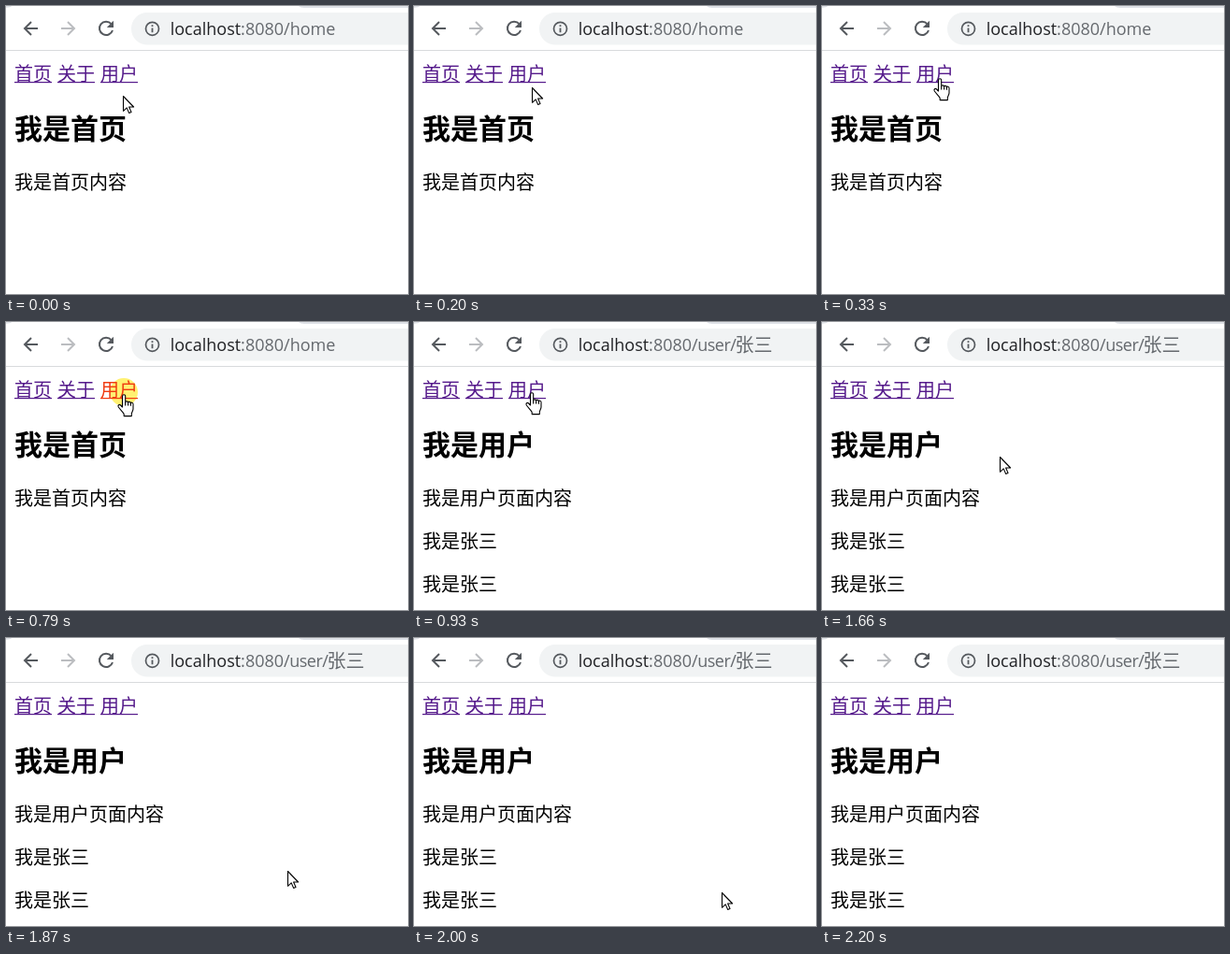
Write an HTML page that moves like this. It is 430 px wide and 308 px high and loops after 2660 ms.

```html
<!DOCTYPE html>
<html lang="zh-CN">
<head>
<meta charset="utf-8">
<title>首页</title>
<style>
html, body { margin: 0; width: 100%; height: 100%; overflow: hidden; background: #fff; }
svg { display: block; width: 430px; height: 308px; }
text { font: 400 20px "Noto Sans CJK SC", "Noto Sans CJK", sans-serif; fill: #000; }
.title { font-size: 30px; font-weight: 700; }
.url { font: 400 18px "Open Sans", "Noto Sans", sans-serif; fill: #202124; }
.path { fill: #65696e; }
.tight { letter-spacing: -.5px; }
.link text, .link rect { fill: #551a8b; }
.link.active text, .link.active rect { fill: #f03a10; }
.icon { fill: none; stroke: #55595e; stroke-width: 2; }
.cursor { fill: #fff; stroke: #000; stroke-width: 1.1; stroke-linejoin: round; }
</style>
</head>
<body>
<svg viewBox="0 0 430 308">
  <!-- browser toolbar -->
  <path d="M0 0H6Q5 1.6 0 1.8ZM313 0H430V2H319Q315 2 313 0Z" fill="#dee1e6"/>
  <rect y="47" width="430" height="1" fill="#d8dadd"/>
  <rect x="134" y="7" width="330" height="34.5" rx="17.2" fill="#f1f3f4"/>
  <path class="icon" d="M34 24H20M27 17L20 24L27 31"/>
  <path class="icon" d="M59 24H73M66 17L73 24L66 31" style="stroke:#bbbdc0"/>
  <path class="icon" d="M112.6 19.2A7.2 7.2 0 1 0 114 26"/>
  <path d="M115 15.8V23H107.8Z" fill="#55595e"/>
  <circle class="icon" cx="156.5" cy="24.3" r="7" style="stroke-width:1.7"/>
  <path d="M155.6 23.4h1.8v4.8h-1.8zM155.6 20.2h1.8v1.8h-1.8z" fill="#55595e"/>
  <text class="url" x="175.7" y="31">localhost<tspan class="path">:8080</tspan><tspan class="path" id="path"></tspan></text>
  <text class="path" id="param" x="343.5" y="31.6">张三</text>

  <!-- page -->
  <circle id="glow" cx="126" cy="75" r="15" fill="#ffee59" opacity=".85"/>
  <g id="links"></g>
  <text class="title" id="title" x="9" y="142.3"></text>
  <text id="body" x="9" y="195.5"></text>
  <g id="user">
    <text x="9" y="241.5">我是张三</text>
    <text x="9" y="287.5">我是张三</text>
  </g>

  <g id="arrow" class="cursor">
    <path d="M.5 .5V16.3L4.2 12.9L6.6 18.4L9 17.4L6.6 12H11.6Z"/>
  </g>
  <g id="hand" class="cursor">
    <path d="M5.5 14V2.3a1.6 1.6 0 0 1 3.2 0V9c0-1.6 2.9-1.5 2.9.3c0-1.4 2.8-1.2 2.8.6c.1-1.2 2.6-1 2.6.9V16c0 2-1.7 3.4-1.7 5.4V23.6H7.2V21.4C6 19 3.4 17 1.3 14C.2 12 2.2 10.6 3.6 12Z"/>
    <path d="M8.7 9V12.6M11.6 9.3V12.6M14.4 9.9V12.8" fill="none"/>
  </g>
</svg>
<script>
const LOOP = 2660, PRESS = 790, RELEASE = 930;
const $ = id => document.getElementById(id);

// Pointer samples: start time, shape, left, top
const moves = [
  [0, 'arrow', 125, 96],
  [70, 'arrow', 125, 95],
  [140, 'arrow', 126, 91],
  [200, 'arrow', 126, 87],
  [270, 'hand', 119, 80],
  [330, 'hand', 119, 77],
  [930, 'hand', 119, 75],
  [1520, 'hand', 125, 82],
  [1590, 'arrow', 150, 103],
  [1660, 'arrow', 190, 144],
  [1730, 'arrow', 235, 188],
  [1800, 'arrow', 273, 224],
  [1870, 'arrow', 301, 249],
  [1930, 'arrow', 318, 263],
  [2000, 'arrow', 329, 272],
  [2060, 'arrow', 336, 282],
  [2130, 'arrow', 343, 296],
  [2200, 'none', 0, 0]
];

$('links').innerHTML = ['首页', '关于', '用户'].map((label, i) =>
  `<g class="link" transform="translate(${9 + 46 * i})">
    <text y="79.6">${label}</text><rect y="81" width="40" height="1.2"/></g>`).join('');
const userLink = $('links').lastElementChild;

const show = (node, on) => node.setAttribute('visibility', on ? 'visible' : 'hidden');

function draw(t) {
  const pressed = t >= PRESS && t < RELEASE;
  const onUser = t >= RELEASE;
  show($('glow'), pressed);
  userLink.classList.toggle('active', pressed);

  $('path').textContent = onUser ? '/user/' : '/home';
  $('path').classList.toggle('tight', onUser);
  $('title').textContent = onUser ? '我是用户' : '我是首页';
  $('body').textContent = onUser ? '我是用户页面内容' : '我是首页内容';
  show($('param'), onUser);
  show($('user'), onUser);

  const [, shape, x, y] = moves.filter(m => m[0] <= t).pop();
  for (const id of ['arrow', 'hand']) {
    show($(id), id === shape);
    $(id).setAttribute('transform', `translate(${x} ${y})`);
  }
}

const start = performance.now();
function tick() {
  draw((performance.now() - start) % LOOP);
  requestAnimationFrame(tick);
}
tick();
</script>
</body>
</html>
```
